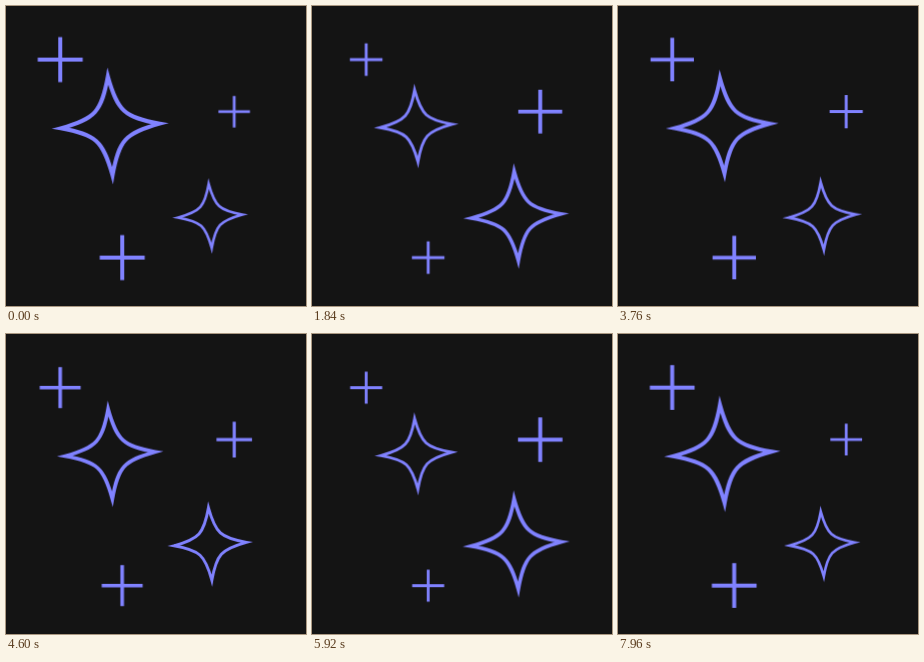
An HTML page for the animation above (8000 ms loop, 300 by 300 pixels).

```html
<!DOCTYPE html>
<html lang="en">
<head>
<meta charset="utf-8">
<title>Twinkling stars</title>
<style>
  html, body { margin: 0; width: 100%; height: 100%; overflow: hidden; background: #141414; }
  svg { display: block; width: 100vw; height: 100vh; }
  path { fill: none; stroke: #8082ff; stroke-width: 4; stroke-miterlimit: 12; }
</style>
</head>
<body>
<svg id="stage" viewBox="0 0 300 300"></svg>
<script>
const HALF_CYCLE = 2000;
const SMALL = 0.7;
const PLUS = "M-22.5 0H22.5M0-22.5V22.5";

// Four concave sides; each leaves its tip at a narrow angle.
function starPath(radius, handle, tipAngle, tilt) {
  const rad = Math.PI / 180;
  const point = (x, y, turn) => {
    const a = (turn + tilt) * rad;
    return [x * Math.cos(a) - y * Math.sin(a), x * Math.sin(a) + y * Math.cos(a)]
      .map(v => v.toFixed(2)).join(" ");
  };
  const along = radius - handle * Math.cos(tipAngle * rad);
  const aside = handle * Math.sin(tipAngle * rad);
  let d = "M" + point(0, -radius, 0);
  for (let turn = 0; turn < 360; turn += 90) {
    d += "C" + [point(aside, -along, turn), point(-aside, -along, turn + 90),
                point(0, -radius, turn + 90)].join(" ");
  }
  return d + "Z";
}

const STAR = starPath(49.6, 36, 12.8, -2.7);

const shapes = [
  { d: PLUS, x: 54.2, y: 53.6, size: 1, from: 1, to: SMALL },
  { d: PLUS, x: 116.2, y: 251.6, size: 1, from: 1, to: SMALL },
  { d: STAR, x: 104.2, y: 119.9, size: 1, from: 1, to: SMALL },
  { d: PLUS, x: 228.2, y: 105.6, size: 1, from: SMALL, to: 1 },
  { d: STAR, x: 204.2, y: 210, size: 0.925, from: SMALL, to: 1 }
];

const stage = document.getElementById("stage");
for (const { d, x, y, size, from, to } of shapes) {
  const path = document.createElementNS("http://www.w3.org/2000/svg", "path");
  path.setAttribute("d", d);
  stage.append(path);
  const pose = scale => ({ transform: `translate(${x}px, ${y}px) scale(${scale * size})` });
  path.animate([pose(from), pose(to)], {
    duration: HALF_CYCLE, iterations: Infinity, direction: "alternate", easing: "linear"
  });
}
</script>
</body>
</html>
```
